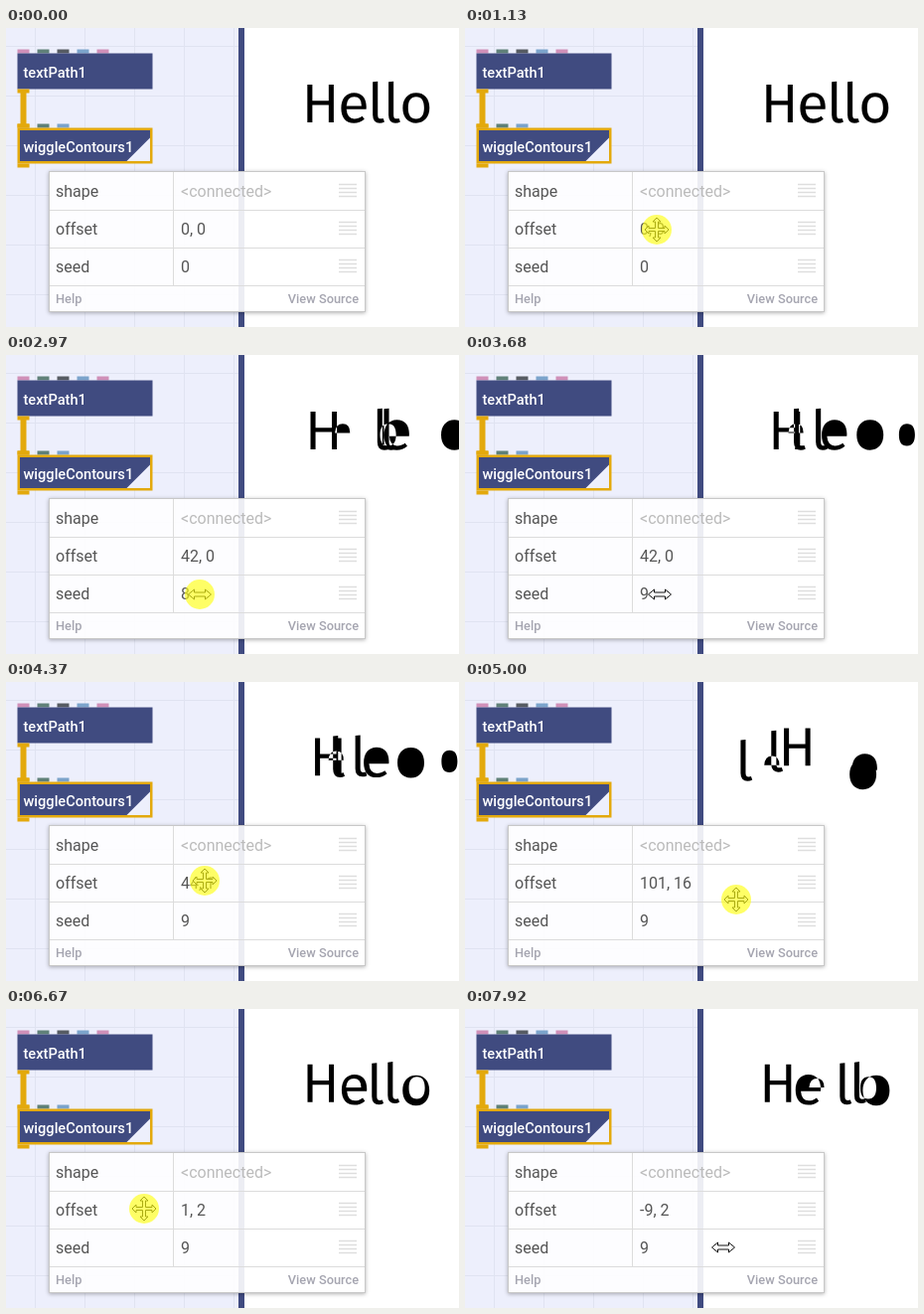
These frames come from a looping animation (456 px wide and 301 px high, 8 s). An HTML page:

```html
<!DOCTYPE html>
<html lang="en">
<head>
<meta charset="utf-8">
<title>Wiggle contours</title>
<style>
  html, body { margin: 0; width: 100%; height: 100%; overflow: hidden; background: #fff; }
  svg { display: block; width: 456px; height: 301px; font-family: Roboto, sans-serif; }
  foreignObject { overflow: visible; }
  .panel {
    box-sizing: border-box; width: 319px; height: 142px; border: 1px solid #c8c8c8;
    background: rgba(255, 255, 255, .9); box-shadow: 0 1px 4px rgba(0, 0, 0, .3);
  }
  .node { fill: #fff; font-size: 14.6px; font-weight: 500; }
  .row { fill: #555; font-size: 16px; }
  .foot { fill: #a5a5b0; font-size: 12.8px; font-weight: 500; }
  .faint { fill: #bbb; }
  .rule { stroke: #dcdcdc; }
  #glow { fill: #ffff14; opacity: .65; }
  #arrow { fill: #fff; stroke: #111; stroke-linejoin: round; }
</style>
</head>
<body>
<svg viewBox="0 0 456 301">
  <defs>
    <pattern id="grid" x="29" y="18" width="50" height="50" patternUnits="userSpaceOnUse">
      <path d="M0 .5H50M.5 0V50" stroke="#e0e3f1"/>
    </pattern>
    <path id="menu" d="M335 -6.5h18m-18 4h18m-18 4h18m-18 4h18" stroke="#dedede" stroke-width="1.5"/>
  </defs>

  <rect width="456" height="301" fill="#fff"/>
  <path id="word" transform="translate(298 95) scale(.055 -.055)"/>

  <rect width="234" height="301" fill="#edeffc"/>
  <rect width="234" height="301" fill="url(#grid)"/>
  <rect x="234" width="6" height="301" fill="#404b80"/>

  <g transform="translate(-.5 -.5)">
    <g id="ports"></g>
    <rect x="12" y="26" width="136" height="36" fill="#404b80"/>
    <path d="M12 62h12v4h-3v31h3v4h-12v-4h3v-31h-3zM12 137h12v4h-12z" fill="#e3a90c"/>
    <rect x="13.25" y="102.25" width="133.5" height="33.5" fill="#404b80" stroke="#e3a90c" stroke-width="2.5"/>
    <path d="M145.5 111v23.5h-23.5z" fill="#edeffc"/>
    <text class="node" x="18" y="50.5">textPath1</text>
    <text class="node" x="18" y="125.5">wiggleContours1</text>
  </g>

  <foreignObject x="43" y="144" width="319" height="142"><div class="panel"></div></foreignObject>
  <path class="rule" d="M44 183.5H361M44 221.5H361M44 259.5H361M168.5 145V259"/>
  <g class="row">
    <text x="50" y="170">shape</text>
    <text x="50" y="208">offset</text>
    <text x="50" y="246">seed</text>
    <text class="faint" x="176" y="170">&lt;connected&gt;</text>
    <text id="offset" x="176" y="208"></text>
    <text id="seed" x="176" y="246"></text>
  </g>
  <use href="#menu" y="164"/><use href="#menu" y="202"/><use href="#menu" y="240"/>
  <text class="foot" x="50" y="277">Help</text>
  <text class="foot" x="355" y="277" text-anchor="end">View Source</text>

  <path id="arrow"/>
  <circle id="glow" r="15"/>
</svg>
<script>
const $ = id => document.getElementById(id);
const LOOP = 8000;
const ZOOM = 1.25;
const LAG = 50;

// Letter contours in font units; counters run against their outlines.
const ell = 'M78 136 L78 739 L170 750 L170 138 Q170 101 183 83 T226 66 Q250 66 269 74 L293 10 Q253 -12 204 -12 Q145 -12 111.5 25 T78 136Z';
const contours = [
  [0, 'M488 0 L488 318 L189 318 L189 0 L97 0 L97 689 L189 689 L189 396 L488 396 L488 689 L580 689 L580 0Z'],
  [667, 'M510 285 Q510 263 508 240 L146 240 Q152 150 190 107 T288 64 Q329 64 363 76 T435 114 L475 59 Q391 -12 282 -12 C130 -12 49 90 49 260 C49 424 135 541 284 541 C430 541 510 442 510 285Z'],
  [667, 'M421 302 L421 308 Q421 386 388 427 T289 468 Q158 468 146 302Z'],
  [1216, ell],
  [1505, ell],
  [1794, 'M49 264 C49 430 140 541 295 541 S539 432 539 266 S448 -12 294 -12 S49 97 49 264Z'],
  [1794, 'M148 264 C148 136 194 63 294 63 S440 136 440 266 S394 467 295 467 S148 394 148 264Z']
];

// Places the hand passes: time, x, y.
const stops = [
  [70, 276, 246], [820, 191, 203], [1060, 191, 203], [1750, 243, 203], [1970, 243, 203],
  [2500, 187, 240], [2700, 187, 240], [2900, 195, 241], [3000, 195, 241], [3130, 177, 241],
  [3400, 196, 241], [3680, 196, 241], [4150, 194, 198], [4220, 194, 198], [5200, 282, 222],
  [5950, 192, 202.4], [7000, 123, 200.5], [7380, 123, 200.5], [7620, 185, 193], [7920, 260, 240]
];
const presses = [[900, 1970], [2560, 3450], [4200, 7200]];

const shapes = {
  move: 'M0 -12l4 4h-2.5v6.5h6.5v-2.5l4 4-4 4v-2.5h-6.5v6.5h2.5l-4 4-4-4h2.5v-6.5h-6.5v2.5l-4-4 4-4v2.5h6.5v-6.5h-2.5z',
  slide: 'M-11.5 0l6-5v3h11v-3l6 5-6 5v-3h-11v3z',
  plain: 'M0 0v16.5l4-3.7 2.8 6.2 2.6-1.1-2.8-6h5.4z'
};

const clamp = (v, lo, hi) => Math.min(hi, Math.max(lo, v));
const smooth = p => p * p * (3 - 2 * p);

function pointerAt(t) {
  const i = clamp(stops.findLastIndex(s => s[0] <= t), 0, stops.length - 2);
  const [t0, x0, y0] = stops[i], [t1, x1, y1] = stops[i + 1];
  const p = smooth(clamp((t - t0) / (t1 - t0), 0, 1));
  return [x0 + (x1 - x0) * p, y0 + (y1 - y0) * p];
}

// How far the hand has pulled a value between two times.
function pull(t, start, end) {
  const [x0, y0] = pointerAt(start);
  const [x, y] = pointerAt(clamp(t - LAG, start, end));
  return [x - x0, y - y0];
}

function randomFrom(seed) {
  return () => (seed = (seed * 9301 + 49297) % 233280) / 233280;
}

function wiggle(ox, oy, seed) {
  const random = randomFrom(seed);
  const shift = offset => (random() - .5) * 2 * offset * ZOOM / .055;
  return contours.map(([left, d]) => {
    const dx = left + shift(ox);
    const dy = shift(oy);
    return d.replace(/(-?[\d.]+) (-?[\d.]+)/g, (_, x, y) => `${+x + dx} ${+y - dy}`);
  }).join('');
}

function drawPorts() {
  const colors = { p: '#cf8fb8', g: '#5f8078', d: '#565b62', b: '#7ba3cb', o: '#e3a90c' };
  const row = (kinds, y) => [...kinds].map((k, i) =>
    `<rect x="${12 + i * 20}" y="${y}" width="12" height="4" fill="${colors[k]}"/>`).join('');
  $('ports').innerHTML = row('pgdbp', 22) + row('ogb', 97);
}

function draw(t) {
  const [x, y] = pointerAt(t);
  const first = pull(t, 1060, 1800), second = pull(t, 4220, 6772);
  const [ox, oy] = first.map((v, i) => Math.round((v + second[i]) / ZOOM));
  const seed = Math.round(pull(t, 2700, 3450)[0]);
  const kind = t >= 7380 && x < 169 ? 'plain' : y > 222 ? 'slide' : 'move';
  const pressed = presses.some(([a, b]) => t >= a && t < b);
  const place = `translate(${Math.round(x)} ${Math.round(y)})`;

  $('word').setAttribute('d', wiggle(ox, oy, seed));
  $('offset').textContent = `${ox}, ${oy}`;
  $('seed').textContent = seed;
  $('arrow').setAttribute('d', t < 70 ? '' : shapes[kind]);
  $('arrow').setAttribute('transform', place);
  $('glow').setAttribute('transform', place);
  $('glow').style.display = pressed ? '' : 'none';
}

function tick() {
  draw(performance.now() % LOOP);
  requestAnimationFrame(tick);
}

drawPorts();
tick();
</script>
</body>
</html>
```
